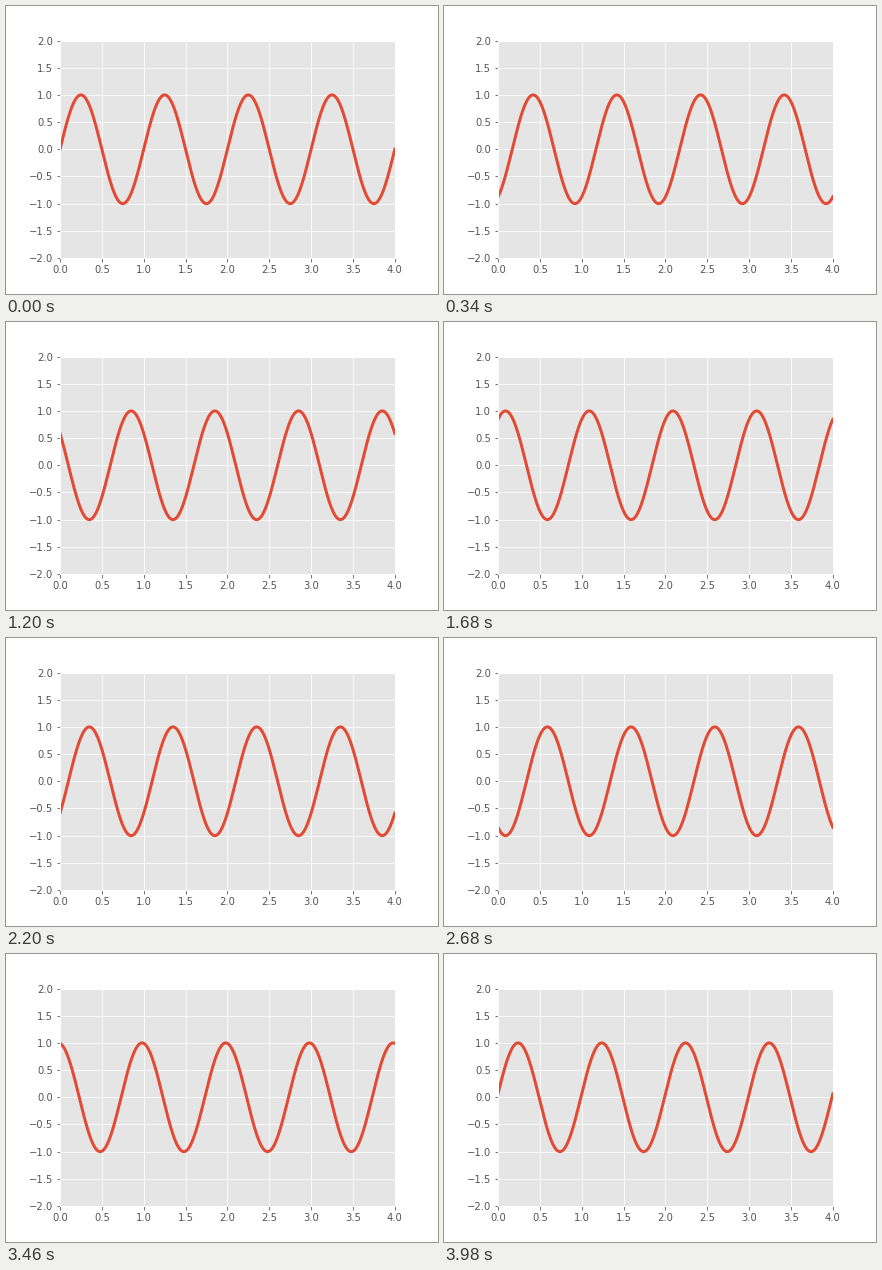
A matplotlib script that plays this animation: 432x288 px, repeating every 4000 ms.

```python
import numpy as np
import matplotlib.pyplot as plt
from matplotlib.animation import FuncAnimation

FRAMES = 200
INTERVAL = 20   # ms
STEP = 0.01     # distance the wave travels per frame

plt.style.use("ggplot")
plt.rcParams["font.family"] = "DejaVu Sans"

fig = plt.figure(figsize=(6, 4), dpi=72, facecolor="white")
fig.subplots_adjust(left=0.125, right=0.9, bottom=0.125, top=0.88)
ax = fig.add_subplot(xlim=(0, 4), ylim=(-2, 2))

x = np.linspace(0, 4, 1000)
line, = ax.plot(x, np.sin(2 * np.pi * x), lw=3)


def update(i):
    line.set_ydata(np.sin(2 * np.pi * (x - STEP * i)))
    return line,


anim = FuncAnimation(fig, update, frames=FRAMES, interval=INTERVAL,
                     repeat=True, repeat_delay=0, blit=False)
plt.show()
```
